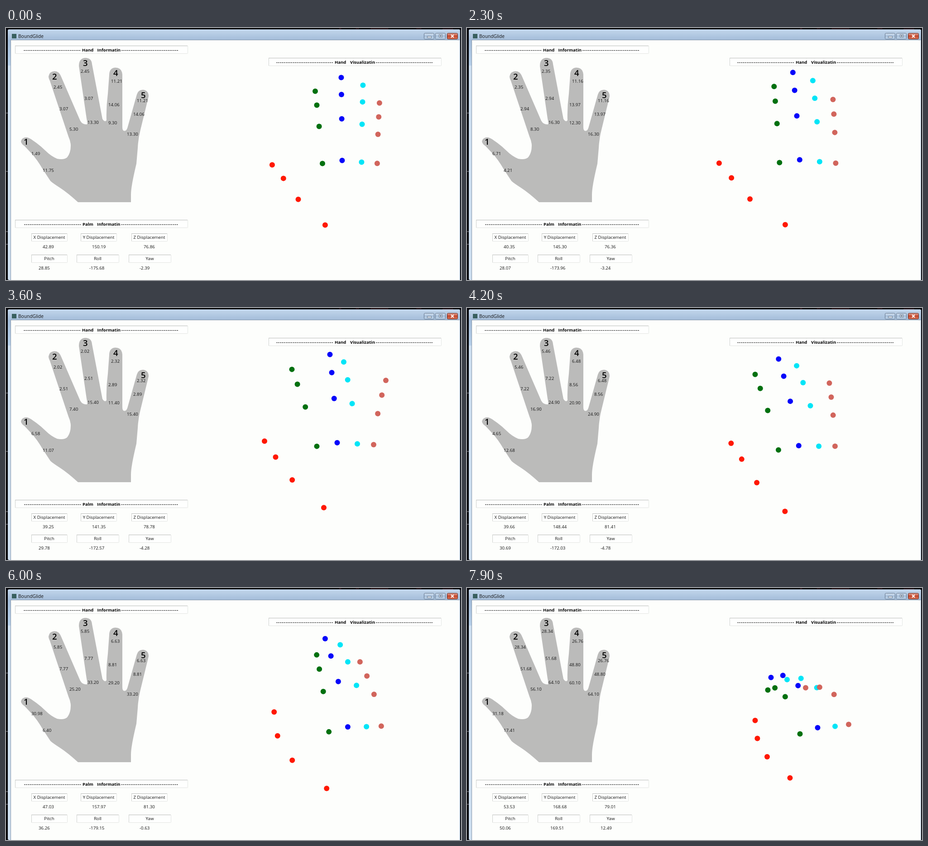
An HTML page that plays this animation: 1005 px wide and 557 px high, repeating every 8 s.

```html
<!DOCTYPE html>
<html lang="en">
<head>
<meta charset="utf-8">
<title>Hand tracking</title>
<style>
  html, body { margin: 0; width: 100%; height: 100%; overflow: hidden; background: #000; }
  svg { display: block; width: 1005px; height: 557px; }
  text { font: 9.7px "Open Sans", "Noto Sans", sans-serif; fill: #151515; white-space: pre; }
  .bold { font-weight: 700; font-size: 9.5px; fill: #000; }
  .dashes { letter-spacing: 1.02px; }
  .digit { font-size: 18.5px; font-weight: 600; fill: #000; }
  .title { font-size: 10.2px; }
  .mid { text-anchor: middle; }
</style>
</head>
<body>
<svg id="stage" viewBox="0 0 1005 557">
  <defs>
    <linearGradient id="bar" x2="0" y2="1">
      <stop offset="0" stop-color="#c3d7ec"/><stop offset=".3" stop-color="#a3bcd9"/>
      <stop offset="1" stop-color="#b7d0ea"/>
    </linearGradient>
    <linearGradient id="glass" x2="0" y2="1">
      <stop offset="0" stop-color="#d3e1f0"/><stop offset=".5" stop-color="#a9c0da"/>
      <stop offset="1" stop-color="#c0d6ec"/>
    </linearGradient>
    <linearGradient id="red" x2="0" y2="1">
      <stop offset="0" stop-color="#e3a596"/><stop offset=".5" stop-color="#c4472c"/>
      <stop offset="1" stop-color="#d8765a"/>
    </linearGradient>
  </defs>
  <rect width="1005" height="557" fill="#05060c"/>
  <path d="M735 1.5h6M772 1h8M805 1.500h40M906 1h12M964 2h24" stroke="#5c3437"/>
  <path d="M0 188h4M0 317h4M0 450h4M0 478h4" stroke="#55555c" stroke-width="2"/>
  <rect x="4" y="3" width="999" height="554" rx="3" fill="#cfe0f1"/>
  <path d="M4 83V7q0-4 4-4H999q4 0 4 4V27H11V83Z" fill="url(#bar)"/>
  <rect x="11" y="26.5" width="990" height="531" fill="#fdfefc"/>
  <path d="M10.5 557V26.5H1001" fill="none" stroke="#8596aa"/>
  <path d="M1002 27V557" stroke="#dbe7f3" stroke-width="2"/>
  <rect x="13" y="13" width="10" height="10" fill="#39605f"/>
  <text class="title" x="27" y="21.5">BoundGlide</text>
  <g stroke="#60738b">
    <rect x="923.5" y="11.5" width="22" height="13" rx="2" fill="url(#glass)"/>
    <rect x="948.5" y="11.5" width="22" height="13" rx="2" fill="url(#glass)"/>
    <rect x="974.5" y="11.5" width="23" height="13" rx="2" fill="url(#red)" stroke="#632b25"/>
    <rect x="930.5" y="18.5" width="9" height="3" fill="#fff"/>
    <rect x="956.5" y="14.5" width="7" height="6" fill="#fff"/>
    <rect x="958.5" y="16.5" width="3" height="2" fill="#8ca4bf"/>
  </g>
  <path d="M983 15l6 6M989 15l-6 6" stroke="#fff" stroke-width="2"/>
  <path fill="#bbbbba" d="M159 385Q136 364 119 353T98 338L81 312Q69 291 56 277L41 261Q33 256 33 250Q35 242 45 241.500
    Q51 242 60 249Q75 259 87 271T113 289Q128 292 135 286Q143 276 143 260Q143 251 138 240L97 117
    Q94 111 94 107Q96 96 107 95.500Q117 95 122 108L164 205Q169 214 179 213Q180 209 178 200L161 84
    Q161 67 175 66Q189 66 190 80L213 201Q218 209 222 204Q221 175 225 145L228 104
    Q228 88 242 87.500Q256 88 257 103V219Q257 228 262 227.500Q267 227 269 218L289 147
    Q292 136 303 136.500Q315 138 315 151L297 225Q292 244 291 265L288 300Q276 350 276 368V385Z"/>
</svg>
<script>
const stage = document.getElementById('stage');
const LOOP = 8000, STEP = 100;
const TIMES = [1000, 2300, 3600, 4800, 6000, 7100, 7900];
const movers = [];
let segment = 0, part = 0;

// A quantity that passes through one key value per entry of TIMES.
const track = (...keys) => () => keys[segment] + (keys[segment + 1] - keys[segment]) * part;

function add(tag, attrs, content = '') {
  const node = document.createElementNS('http://www.w3.org/2000/svg', tag);
  for (const key in attrs) node.setAttribute(key, attrs[key]);
  node.textContent = content;
  stage.append(node);
  return node;
}

function label(x, y, content, cls = '') {
  return add('text', { x, y, class: cls }, content);
}

function box(x, y, width) {
  add('rect', { x: x + .5, y: y + .5, width, height: 17, rx: 1, fill: '#fefffe', stroke: '#e3e5e3' });
  add('path', { d: `M${x} ${y + .5}h${width}`, stroke: '#b9bbb9' });
  add('path', { d: `M${x + .5} ${y}v17`, stroke: '#c3c5c3', 'stroke-dasharray': '2 1' });
}

function heading(x, y, first, second, firstX, secondX, endX) {
  const dashes = '-'.repeat(31), base = y + 12.5;
  box(x, y, 381);
  label(firstX - 129, base, dashes, 'bold dashes');
  label(firstX, base, first, 'bold');
  label(secondX, base, second, 'bold');
  label(endX, base, dashes, 'bold dashes');
}

// Angles below -180 degrees wrap round.
function reading(x, centerY, value) {
  const node = label(x, centerY + 3.5, '');
  movers.push(() => {
    const v = value();
    node.textContent = (v < -180 ? v + 360 : v).toFixed(2);
  });
}

function dot(fill, position) {
  const node = add('circle', { r: 6, fill });
  movers.push(() => {
    const [x, y] = position();
    node.setAttribute('cx', x);
    node.setAttribute('cy', y);
  });
}

function panel(name, x, y, width, valueX, value) {
  box(x, y, width);
  label(x + width / 2, y + 11.5, name, 'mid');
  reading(valueX, y + 29, value);
}

// Palm state; the knuckles on the right follow it.
const palmX = track(42.89, 40.35, 39.25, 40.08, 47.03, 46.84, 53.53);
const palmY = track(150.19, 145.30, 141.35, 155.54, 157.97, 161.09, 168.68);
const palmZ = track(76.86, 76.36, 78.78, 84.03, 81.30, 82.34, 79.01);
const pitch = track(28.85, 28.07, 29.78, 31.59, 36.26, 37.36, 50.06);
const roll = track(-175.68, -173.96, -172.57, -171.49, -179.15, -181.62, -190.49);
const yaw = track(-2.39, -3.24, -4.28, -5.27, -0.63, 1.25, 12.49);
const shift = () => palmX() - 39.25;
const depth = () => palmZ() - 76.6;
const tilt = () => pitch() - 28.5;

// Bend shared by the fingers, and how far they reach up.
const innerCurl = track(2.45, 2.35, 2.02, 8.91, 5.85, 5.79, 28.34);
const outerCurl = track(11.21, 11.16, 2.32, 10.64, 6.63, 7.65, 26.76);
const knuckleBend = track(10.3, 13.3, 12.4, 31.4, 30.2, 31.1, 61.1);
const reach = track(.94, .99, 1, .965, 1, .98, .57);

// lean: sideways offset of the tip from the knuckle.
const fingers = [
  { color: '#00700f', digit: [102, 114], labels: [[105, 130], [118, 178], [140, 223.5]],
    rest: [686.5, 298.5], length: 170, bend: -5, lean: track(-16, -12, -55, -48, -27, -42, -71) },
  { color: '#0505fa', digit: [170, 84], labels: [[165, 95.5], [173, 155.5], [180, 208]],
    rest: [731.5, 292], length: 195, bend: 3, lean: track(-2, -15, -16, -73, -50, -65, -103) },
  { color: '#00e5f7', digit: [237, 106], labels: [[232, 117.5], [226, 169], [226, 209.5]],
    rest: [776, 296], length: 181, bend: -1, lean: track(3, -15, -30, -68, -58, -66, -106) },
  { color: '#d1655c', digit: [298, 155], labels: [[289, 160.5], [281, 190], [267, 234]],
    rest: [812, 299], length: 142, bend: 3, lean: track(5, -6, 27, -52, -47, -52, -95) }
];

function addThumb() {
  const curl = track(1.49, 6.71, 6.58, 2.72, 30.98, 36.96, 31.18);
  const baseBend = track(11.75, 4.21, 11.07, 14.29, 6.40, 7.59, 17.41);
  const lean = track(-117, -146, -131, -107, -116, -88, -77);
  const rise = track(133, 136, 147, 154, 169, 143, 127);
  const along = [
    () => [0, 0],
    () => [.5 + .005 * curl(), .43 - .002 * curl()],
    () => [.78 + .005 * curl(), .78 - .003 * curl()],
    () => [1, 1]
  ];
  label(39, 258, '1', 'digit');
  reading(56, 277, curl);
  reading(81, 314, baseBend);
  for (const joint of along) {
    dot('#ff1800', () => {
      const [u, v] = joint();
      return [702 + .8 * shift() + u * lean(), 435 + 3.5 * depth() - 1.1 * tilt() - v * rise()];
    });
  }
}

function addFinger({ color, digit, labels, rest, length, bend, lean }, i) {
  const curl = i < 2 ? innerCurl : outerCurl;
  const bends = [curl, () => curl() * (1.2 + .022 * innerCurl()), () => knuckleBend() + bend];
  label(...digit, String(i + 2), 'digit');
  labels.forEach(([x, y], k) => reading(x, y, bends[k]));

  // Curling lifts the middle joints to the height of the tip.
  const fist = () => (innerCurl() / 28) ** 2;
  const along = [
    () => [0, 0],
    () => [.46 - .04 * i, .51 - .01 * i + .33 * fist()],
    () => [.78 - .035 * i, .805 - .012 * i + .24 * fist()],
    () => [1, 1]
  ];
  for (const joint of along) {
    dot(color, () => {
      const [u, v] = joint();
      const x = rest[0] + (3.43 - .42 * i) * shift();
      const y = rest[1] + (2.8 - .47 * i) * depth() + (.8 - .28 * i) * tilt();
      return [x + u * lean(), y - v * length * reach()];
    });
  }
}

heading(20, 39, 'Hand', 'Informatin', 168, 201.5, 255);
heading(580, 66, 'Hand', 'Visualizatin', 726, 760, 817);
heading(20, 424, 'Palm', 'Informatin', 169, 201, 254.5);
addThumb();
fingers.forEach(addFinger);
panel('X Displacement', 56, 454, 79, 81, palmX);
panel('Y Displacement', 165, 454, 79, 190, palmY);
panel('Z Displacement', 277, 454, 79, 304, palmZ);
panel('Pitch', 56, 501, 79, 72, pitch);
panel('Roll', 156, 501, 93, 184, roll);
panel('Yaw', 271, 501, 93, 295, yaw);

function draw(now) {
  const held = Math.floor((now % LOOP + .01) / STEP) * STEP;
  const time = Math.min(Math.max(held, TIMES[0]), TIMES.at(-1));
  const next = Math.max(1, TIMES.findIndex(t => t >= time));
  segment = next - 1;
  part = (time - TIMES[segment]) / (TIMES[next] - TIMES[segment]);
  movers.forEach(move => move());
}

function tick() {
  draw(performance.now());
  requestAnimationFrame(tick);
}
tick();
</script>
</body>
</html>
```
